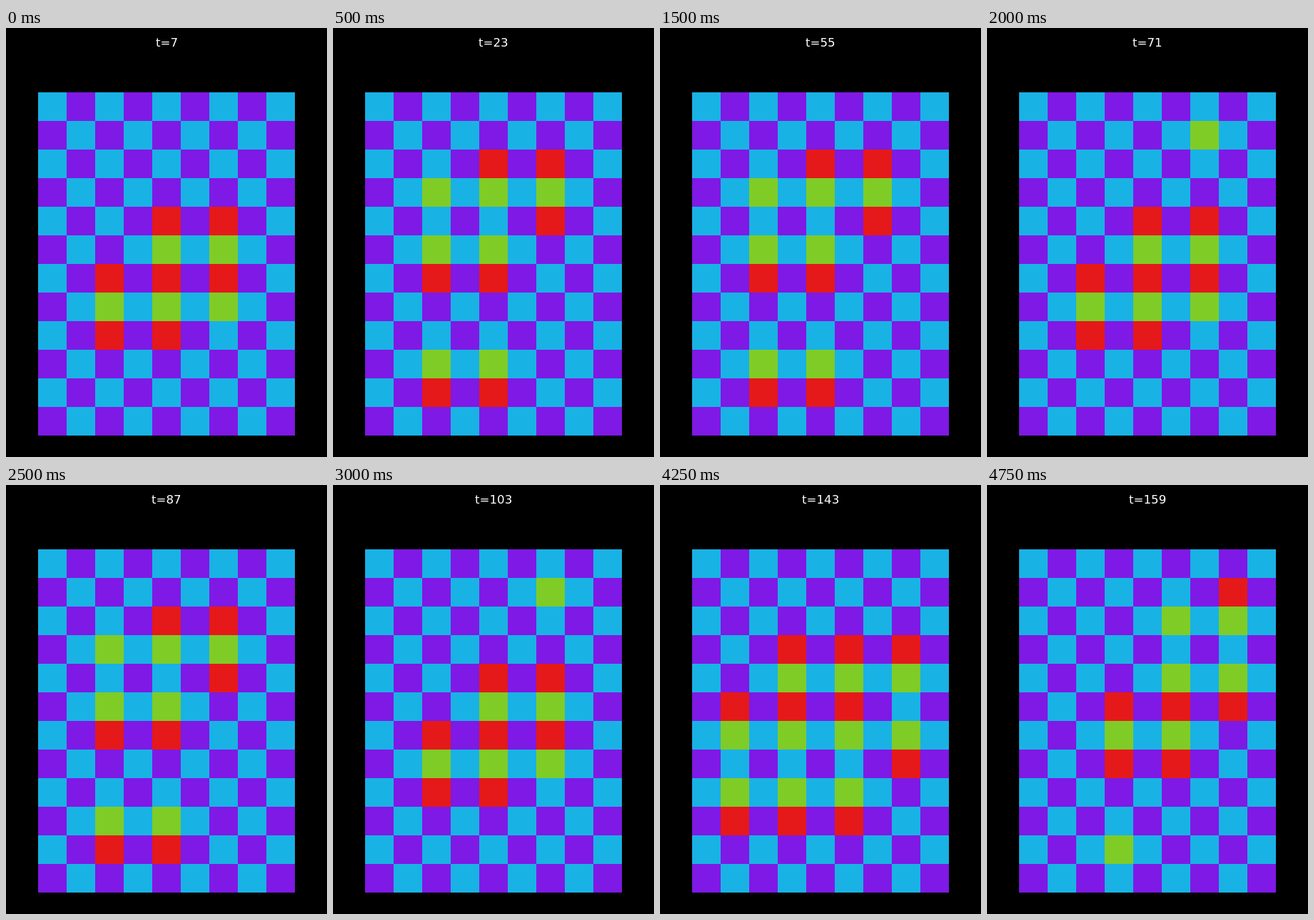
Write an HTML page with a canvas that moves like this. It is 450 px wide and 600 px high and loops after 5000 ms.

```html
<!DOCTYPE html>
<html lang="en">
<head>
<meta charset="utf-8">
<title>Checkerboard states</title>
<style>
html, body { margin: 0; width: 100%; height: 100%; overflow: hidden; background: #000; }
canvas { display: block; }
</style>
</head>
<body>
<canvas id="stage" width="450" height="600"></canvas>
<script>
const ctx = document.getElementById('stage').getContext('2d');
const STEP = 250, STEPS = 20;
const COLS = 9, ROWS = 12, CELL = 40, LEFT = 45, TOP = 90;

// Indexed by the parity of column + row
const OFF = ['#19b2e5', '#7f19e5'];
const ON = ['#e51919', '#7fcc26'];

function cell(col, row, colors) {
  ctx.fillStyle = colors[(col + row) % 2];
  ctx.fillRect(LEFT + col * CELL, TOP + row * CELL, CELL, CELL);
}

// Lights every second column of a block
function patch(col, row, across = 1, down = 1) {
  for (let i = 0; i < across; i++) {
    for (let j = 0; j < down; j++) cell(col + 2 * i, row + j, ON);
  }
}

// Four phases, alternating between even and odd columns
const phases = [
  step => {
    patch(4, 4, 2, 4);
    patch(2, 6, 2, 3);
    if (step > 0) patch(6, 1);
  },
  () => {
    patch(3, 3, 3, 2);
    patch(7, 6, 1, 2);
    for (const row of [5, 8]) patch(1, row, 3, 2);
  },
  () => {
    patch(4, 2, 2, 2);
    patch(2, 3);
    patch(6, 4);
    for (const row of [5, 9]) patch(2, row, 2, 2);
  },
  () => {
    patch(7, 1);
    patch(5, 2, 2);
    patch(5, 4, 2, 2);
    patch(3, 5, 2, 3);
    patch(3, 10);
  }
];

// Centres the visible ink on whole pixels
function title(text) {
  ctx.fillStyle = '#fff';
  ctx.font = '16.67px "DejaVu Sans", sans-serif';
  const ink = ctx.measureText(text);
  const shift = (ink.actualBoundingBoxRight - ink.actualBoundingBoxLeft) / 2;
  ctx.fillText(text, Math.round(225 - shift), 26);
}

function draw(step) {
  ctx.fillStyle = '#000';
  ctx.fillRect(0, 0, 450, 600);
  for (let row = 0; row < ROWS; row++) {
    for (let col = 0; col < COLS; col++) cell(col, row, OFF);
  }
  phases[step % phases.length](step);
  title('t=' + (7 + 8 * step));
}

const start = performance.now();
function tick() {
  draw(Math.floor((performance.now() - start) / STEP) % STEPS);
  requestAnimationFrame(tick);
}
tick();
</script>
</body>
</html>
```
